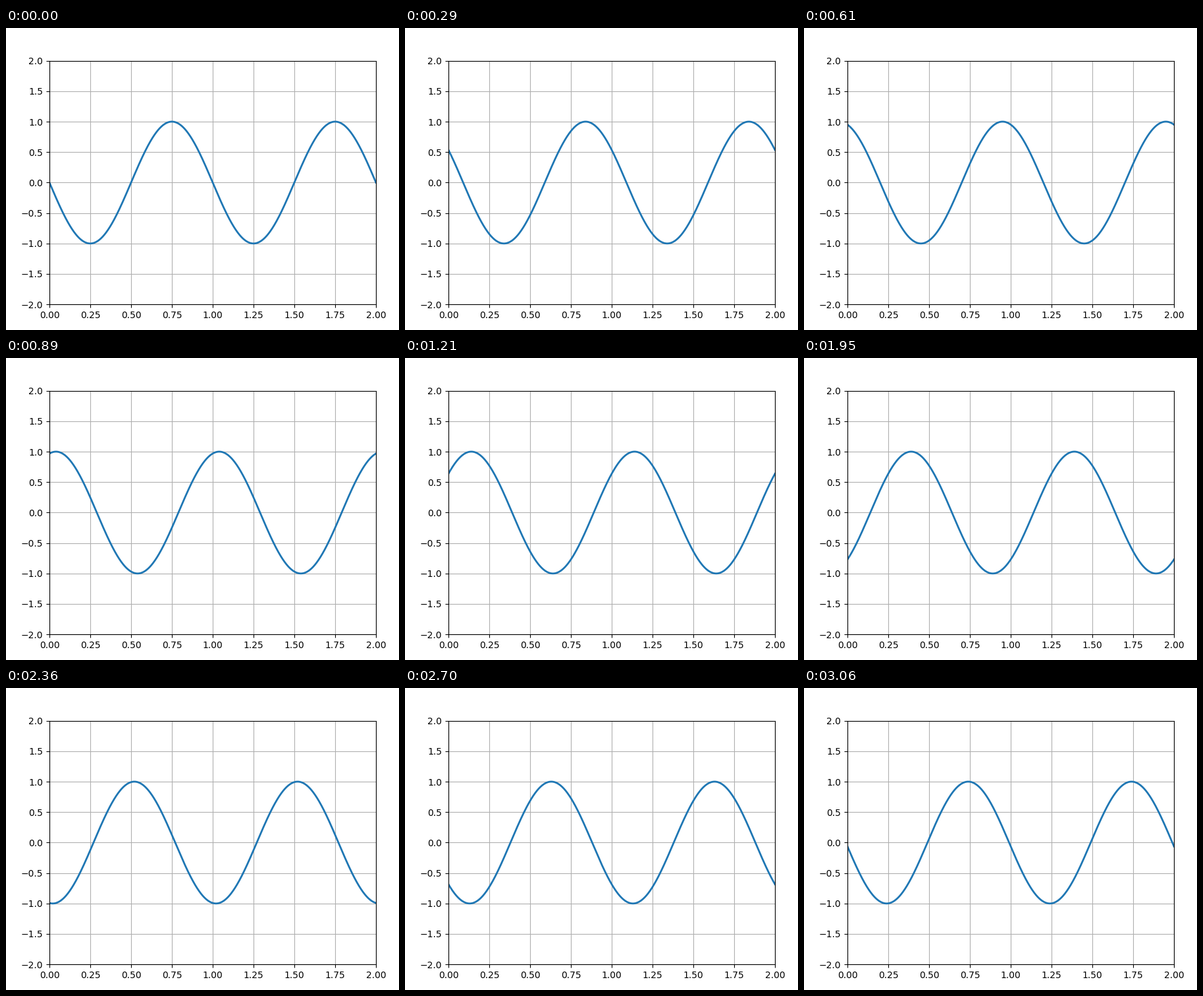
A matplotlib script for the animation above (3090 ms loop, 597 by 458 pixels).

```python
import numpy as np
import matplotlib.pyplot as plt
from matplotlib.animation import FuncAnimation

W, H, DPI = 597, 458, 100
FRAMES, INTERVAL = 103, 30

# The wave drifts right in steps of 0.01, with a slightly uneven pace.
PACE_MS = [0, 610, 1210, 1490, 1950, 2360, 3060]
PACE_STEP = [0, 20, 39, 47, 64, 77, 99]

fig = plt.figure(figsize=(W / DPI, H / DPI), dpi=DPI, facecolor="white")
ax = fig.add_axes([66 / W, 38.8 / H, 496 / W, 369.6 / H])
ax.set(xlim=(0, 2), ylim=(-2, 2))
ax.set_xticks(np.arange(0, 2.01, 0.25))
ax.set_yticks(np.arange(-2, 2.01, 0.5))
ax.grid()

x = np.linspace(0, 2, 1000)
line, = ax.plot([], [], lw=2, color="C0")


def shift(n):
    return 0.01 * np.round(np.interp(n * INTERVAL + 10, PACE_MS, PACE_STEP))


def update(n):
    # The first pose starts exactly at zero phase.
    s = shift(n) if n else 0.0
    line.set_data(x, np.sin(2 * np.pi * (x - s) + np.pi))
    return line,


anim = FuncAnimation(fig, update, frames=FRAMES, interval=INTERVAL,
                     repeat=True, repeat_delay=0)
plt.show()
```
